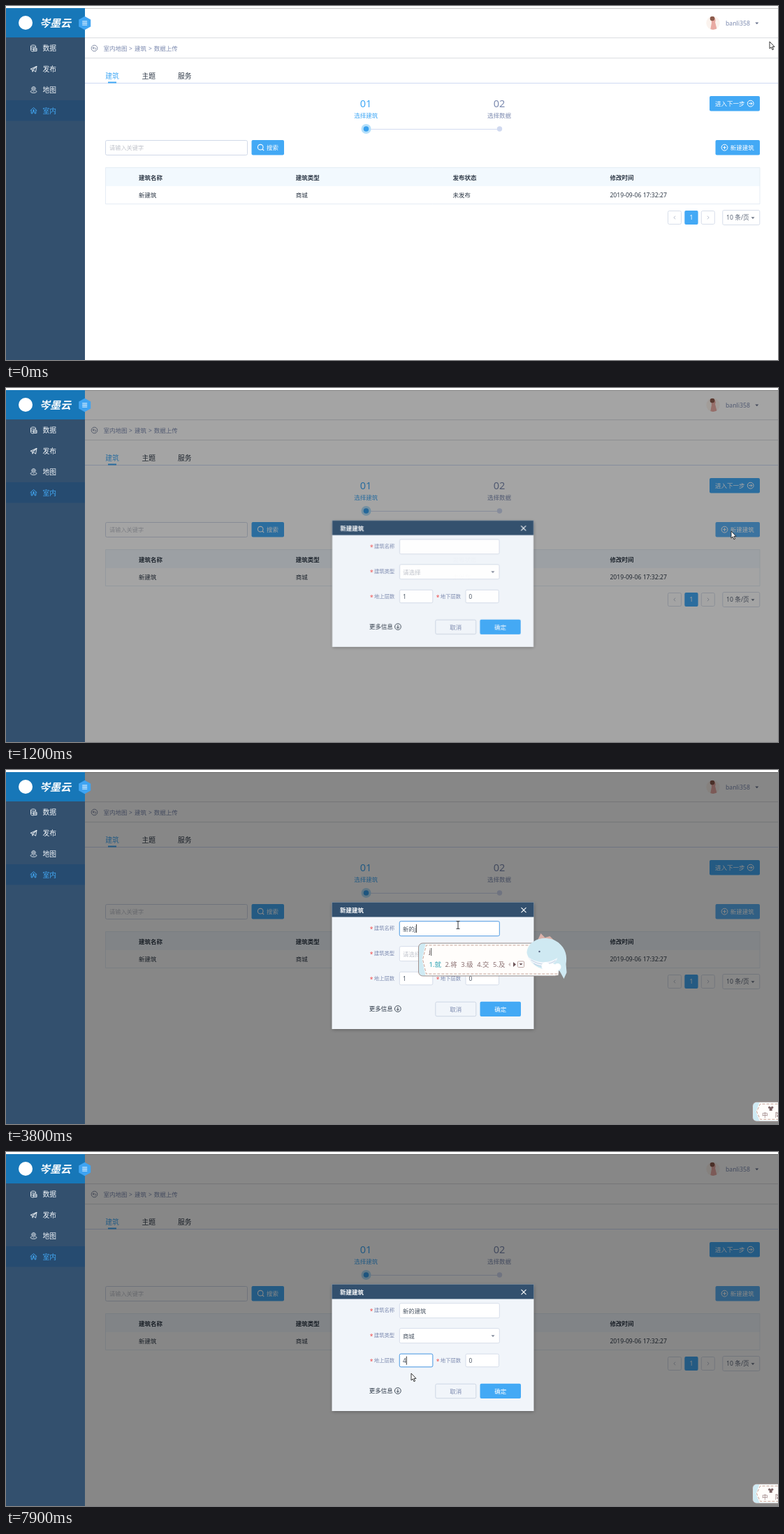
An HTML page with a canvas that plays this animation: 1105 by 507 pixels, repeating every 8 s.

```html
<!DOCTYPE html>
<html lang="zh-CN">
<head>
<meta charset="utf-8">
<style>
html, body { margin: 0; width: 100%; height: 100%; overflow: hidden; background: #fff; }
canvas { display: block; }
</style>
</head>
<body>
<canvas id="stage" width="1105" height="507"></canvas>
<script>
const W = 1105, H = 507, LOOP = 8000, STEP = 100;
const FONT = '"Noto Sans", "Noto Sans CJK SC", "Noto Sans CJK JP", sans-serif';
const BLUE = '#43a9f5', NAVY = '#33506e', LINE = '#d3dbe8', HINT = '#c0c4cc', DARK = '#2f3a48', MUTED = '#7d8bb0';

const screen = document.getElementById('stage').getContext('2d');
const layerCanvas = Object.assign(document.createElement('canvas'), { width: W, height: H });
const layer = layerCanvas.getContext('2d');
let c = screen;

const clamp = v => Math.max(0, Math.min(1, v));
const easeOut = u => 1 - (1 - u) ** 3;

// ---- drawing helpers ----
function text(s, x, y, color = DARK, size = 8.5, style = '', align = 'left') {
  c.font = `${style} ${size}px ${FONT}`;
  c.textAlign = align;
  c.fillStyle = color;
  c.fillText(s, x, y + size * 0.37);
}
function rect(x, y, w, h, fill) {
  c.fillStyle = fill;
  c.fillRect(x, y, w, h);
}
function box(x, y, w, h, fill, stroke, r = 2) {
  c.beginPath();
  c.roundRect(x, y, w, h, r);
  if (fill) { c.fillStyle = fill; c.fill(); }
  if (stroke) { c.strokeStyle = stroke; c.lineWidth = 0.9; c.stroke(); }
}
function disc(x, y, r, fill) {
  c.beginPath();
  c.arc(x, y, r, 0, 7);
  c.fillStyle = fill;
  c.fill();
}
function ring(x, y, r, color, width = 1) {
  c.beginPath();
  c.arc(x, y, r, 0, 7);
  c.strokeStyle = color;
  c.lineWidth = width;
  c.stroke();
}
function path(ox, oy, d, { fill, stroke, width = 1 }) {
  const p = new Path2D(d);
  c.save();
  c.translate(ox, oy);
  if (fill) { c.fillStyle = fill; c.fill(p); }
  if (stroke) { c.strokeStyle = stroke; c.lineWidth = width; c.stroke(p); }
  c.restore();
}
const line = (x, y, d, stroke, width = 1) => path(x, y, d, { stroke, width });
const caretDown = (x, y, fill) => path(x, y, 'M-2.5-1.2H2.5L0 1.5Z', { fill });
const caretUp = (x, y, fill) => path(x, y, 'M-2.5 1.2H2.5L0-1.5Z', { fill });

// ---- page ----
const NAV = [
  ['数据', 'M-4-3C-4-5 3-5 3-3S-4-1-4-3V3C-4 4-2 4.5 0 4.5M3-3V-1M-4 0C-4 1-2 1.5 0 1.5M0 0H4.5V4H0ZM0 2H4.5'],
  ['发布', 'M-4.5 0L4.5-4L3 4L-.5 1.5L-1.5 4L-2 .8ZM-2 .8L4.5-4L-.5 1.5'],
  ['地图', 'M0 2C-5-2-2-4.5 0-4.5S5-2 0 2M-1.3-1.7A1.3 1.3 0 1 0 1.3-1.7A1.3 1.3 0 1 0-1.3-1.7M-2.5 1C-6 2-4 4.3 0 4.3S6 2 2.5 1'],
  ['室内', 'M-4.8 0L0-4.3L4.8 0M-3.3-1V4H-1.5V1.5H1.5V4H3.3V-1M-1.5-.5H1.5M0-2V1.5']
];

function drawSidebar() {
  rect(0, 3, 113, 504, NAVY);
  rect(0, 3, 113, 42, '#1777b8');
  disc(28, 24, 10, '#fff');
  text('岑墨云', 48, 24, '#fff', 15, 'italic bold');
  rect(0, 135, 113, 29.5, '#264b70');
  NAV.forEach(([label, icon], i) => {
    const y = 60.5 + i * 29.8, color = i === 3 ? BLUE : '#f2f6fa';
    line(39.5, y, icon, color, 0.9);
    text(label, 52.5, y, color, 9.8);
  });
  path(112.7, 24.5, 'M0-9.7L8.5-5V5L0 9.7L-8.5 5V-5Z', { fill: '#3fa4f2' });
  line(112.7, 24.5, 'M-3.5-2.5H3.5M-3.5 0H3.5M-3.5 2.5H3.5', '#fff', 1.1);
}

function drawAvatar() {
  c.save();
  c.beginPath();
  c.arc(1012, 24.3, 9.7, 0, 7);
  c.clip();
  rect(1002, 14, 20, 21, '#fbf3ee');
  path(1012, 24, 'M-3-7C2-10 5-5 3-1L6 11H-4L-2 0Z', { fill: '#e9aaa3' });
  disc(1011, 18, 3.3, '#8b5a4c');
  c.restore();
}

function drawPage(hover) {
  rect(0, 0, W, H, '#fff');
  rect(0, 3, W, 1, '#c9c9c9');
  rect(113, 45.2, 992, 0.9, '#d6d9de');
  rect(113, 74.2, 992, 0.9, '#d6d9de');
  rect(113, 110, 992, 1, '#cfdaf3');
  drawAvatar();
  text('banli358', 1030, 24.3, MUTED, 8.7);
  caretDown(1074.8, 24.7, '#66718c');

  ring(126.5, 60.5, 4.3, '#77829c', 0.9);
  line(126.5, 60.5, 'M-.5-2L-2.5-.4L-.5 1.2M-2.5-.4H1C3-.4 2.5 2 .5 2', '#77829c', 0.8);
  [['室内地图', 139.5], ['>', 176], ['建筑', 184], ['>', 204], ['数据上传', 211.7]]
    .forEach(([s, x]) => text(s, x, 60.5, MUTED));

  text('建筑', 142.3, 100.3, BLUE, 9.8);
  text('主题', 194.5, 100.3, DARK, 9.8);
  text('服务', 246, 100.3, DARK, 9.8);
  rect(146, 108.5, 12, 2, BLUE);

  rect(515, 176, 191, 1, '#d3dcf0');
  disc(515.5, 176, 7, '#b5e0fa');
  disc(515.5, 176, 3.8, '#38a0ee');
  disc(706.5, 176, 3.7, '#d0d9f0');
  text('01', 515, 140, BLUE, 14.5, '', 'center');
  text('选择建筑', 515.3, 157, BLUE, 8.5, '', 'center');
  text('02', 706, 140, MUTED, 14.5, '', 'center');
  text('选择数据', 706, 157, MUTED, 8.5, '', 'center');

  box(1007, 129, 72, 21.5, BLUE);
  text('进入下一步', 1015, 139.7, '#fff', 8.5, '500');
  ring(1065.7, 139.7, 4.4, '#fff');
  line(1065.7, 139.7, 'M-2.5 0H2.3M.3-2L2.3 0L.3 2', '#fff');

  box(142.5, 192.5, 203, 21, '#fff', '#ccd5e6');
  text('请输入关键字', 148, 203.3, HINT, 8.2);
  box(351.5, 192, 46.5, 21.5, BLUE);
  ring(364.2, 202.2, 3.8, '#fff', 1.1);
  line(364.2, 202.2, 'M2.7 2.7L5 5', '#fff', 1.2);
  text('搜索', 373, 203, '#fff', 8.5, '500');
  box(1015.5, 192, 63.5, 21.5, hover ? '#5cb3f6' : BLUE);
  ring(1028.5, 202.7, 4.4, '#fff');
  line(1028.5, 202.7, 'M-2.3 0H2.3M0-2.3V2.3', '#fff');
  text('新建建筑', 1036.7, 203, '#fff', 8.5, '500');

  rect(142.5, 231.5, 936.5, 26.5, '#f2f9fe');
  box(142.5, 231.5, 936.5, 52, null, '#e3ebf4', 0);
  const rows = [['建筑名称', '建筑类型', '发布状态', '修改时间'], ['新建筑', '商城', '未发布', '2019-09-06 17:32:27']];
  rows.forEach((row, r) => row.forEach((s, i) =>
    text(s, 190 + i * 224.8, r ? 271 : 245.8, DARK, r && i === 3 ? 8.65 : 8.5, r ? '' : 'bold')));

  box(947.5, 293.5, 19, 19, '#fff', LINE);
  line(957, 303, 'M1.2-2.3L-1.2 0L1.2 2.3', '#b4bccb', 0.9);
  box(971.3, 293, 19.3, 20, BLUE);
  text('1', 981, 303, '#fff', 8.5, '', 'center');
  box(995.3, 293.5, 19, 19, '#fff', LINE);
  line(1005, 303, 'M-1.2-2.3L1.2 0L-1.2 2.3', '#b4bccb', 0.9);
  box(1025.8, 292.5, 53, 21, '#fff', LINE);
  text('10 条/页', 1031, 303.2, '#5c6678', 8.7);
  caretDown(1069, 303.5, '#6b7485');
}

// ---- dialog ----
function field(x, y, w, h, value, { focus, hint, color } = {}) {
  if (focus) box(x - 0.6, y - 0.6, w + 1.2, h + 1.2, '#b9dcfa', null, 3);
  box(x, y, w, h, '#fff', focus ? '#4b97e0' : LINE);
  text(value, x + 4.6, y + h / 2 + 0.2, color || (hint ? HINT : '#4d5866'), hint ? 8.5 : 8.4);
}
function label(s, x, y) {
  text('*', x - 6, y + 1.3, '#f04848', 8.5);
  text(s, x, y, MUTED, 7.35);
}
function caret(x, y) { rect(x, y - 6, 0.9, 12, '#222'); }

function drawDialog(s) {
  c.save();
  c.shadowColor = 'rgba(0,0,0,.35)';
  c.shadowBlur = 5;
  c.shadowOffsetY = 1;
  rect(466.5, 189.5, 289, 181.5, '#f1f5fa');
  c.restore();
  rect(466.5, 189.5, 289, 21, NAVY);
  text('新建建筑', 478, 200.8, '#fff', 8.5, 'bold');
  line(741, 200.7, 'M-3.5-3.5L3.5 3.5M3.5-3.5L-3.5 3.5', '#fff', 1.1);

  label('建筑名称', 526.8, 226.5);
  field(563.3, 216.7, 143, 21, s.name, { focus: s.focus === 'name' });
  if (s.nameCaret) caret(568 + c.measureText(s.name).width, 227);

  label('建筑类型', 526.8, 262.3);
  field(563.3, 252.7, 143, 21, s.type || '请选择', { focus: s.focus === 'type', hint: !s.type });
  (s.menuOpen ? caretUp : caretDown)(697, 263.5, '#7f8899');

  label('地上层数', 526.8, 298.3);
  field(563.3, 289.2, 47.5, 18.6, s.floors, { focus: s.focus === 'floors' });
  if (s.selected) {
    rect(568, 294, 4.8, 11, '#3390ff');
    text(s.floors, 567.9, 298.7, '#fff', 8.4);
  }
  if (s.floorCaret) caret(572.8, 298.7);
  label('地下层数', 621.8, 298.3);
  field(658, 289.2, 47.5, 18.6, '0');

  text('更多信息', 519.8, 342.3, DARK, 8.5, '500');
  ring(560.8, 342, 4.4, DARK, 0.9);
  line(560.8, 342, 'M0-2.5V2.2M-2 .4L0 2.3L2 .4', DARK, 0.9);
  box(614.8, 332.2, 58, 20.5, '#f1f5fa', '#cbd4e3');
  text('取消', 643.8, 342.5, MUTED, 8.5, '', 'center');
  box(678.5, 331.8, 58.5, 21.2, BLUE);
  text('确定', 707.8, 342.5, '#fff', 8.5, '500', 'center');
}

function drawMenu(open, hover) {
  if (open <= 0) return;
  c.save();
  c.globalAlpha = open;
  c.translate(0, 277);
  c.scale(1, 0.8 + 0.2 * open);
  c.save();
  c.shadowColor = 'rgba(0,0,0,.25)';
  c.shadowBlur = 4;
  box(563, 0, 143.5, 119, '#fafafa');
  c.restore();
  if (hover) rect(563, 3, 141, 20, '#f1f1f1');
  ['商城', '办公楼', '机场', '火车站', '展馆', '酒店'].forEach((s, i) =>
    text(s, 572.7, 13 + i * 19.65, '#5a6472'));
  box(704, 0, 2.5, 76, '#c2c4c8', null, 1);
  c.restore();
}

// ---- input method ----
const BROWN = '#8a6f70';
function imeFrame(x, y, w, h) {
  box(x, y, w, h, '#cfeaf3', '#9c8683', 6);
  path(x, y, `M10 1H${w - 1}V${h - 1}H10L5 ${h / 2}Z`, { fill: '#fffdfb' });
  c.save();
  c.setLineDash([4, 2]);
  line(x, y, `M${w - 2} 3H11L6 ${h / 2}L11 ${h - 3}H${w - 2}`, '#c09a8e', 0.9);
  c.restore();
}
function drawWhale(x, y) {
  const skin = c.createLinearGradient(x - 55, y, x, y + 55);
  [[0, '#cfe9f2'], [0.4, '#9fc0df'], [0.7, '#c9b4da'], [1, '#eab9bd']].forEach(([p, col]) => skin.addColorStop(p, col));
  path(x, y, 'M-44 14L-38 1L-32 7L-25 5L-20 10Z', { fill: '#d9b1a9' });
  path(x, y, 'M-58 29C-57 8-28 2-13 14C-2 23 0 34-2 45L-1 57L-5 66L-11 55L-20 52C-36 55-53 48-58 29Z', { fill: skin });
  path(x, y, 'M-57 34C-42 46-25 43-14 36C-19 51-48 53-57 34Z', { fill: '#f2f6fb' });
  line(x, y, 'M-52 39C-38 48-26 46-17 40M-48 44C-38 50-28 49-20 45', '#a9bfd8', 0.7);
  disc(x - 40, y + 27, 1.2, '#53617f');
  [[-31, 48, 6], [-22, 51, 7], [-14, 49, 5]].forEach(([dx, dy, r]) => disc(x + dx, y + dy, r, '#fff'));
}
function drawPopup({ left, spell, words }) {
  const extra = words.reduce((n, w) => n + w.length - 1, 0);
  const width = 201 + extra * 9.4;
  imeFrame(left, 248, width, 47);
  drawWhale(left + width + 12, 233);
  text(spell, left + 15, 260, '#5b4a4e', 9);
  rect(left + 15.5 + c.measureText(spell).width, 255, 0.8, 11, '#333');
  let x = left + 15;
  words.forEach((w, i) => {
    text(`${i + 1}.${w}`, x, 278.5, i ? BROWN : '#25a0b0', 9.4);
    x += 13.5 + w.length * 9.4;
  });
  path(x - 1, 278.5, 'M0 0L3-3V3Z', { fill: '#d0c4c4' });
  path(x + 6, 278.5, 'M4 0L0-3.5V3.5Z', { fill: '#6d5558' });
  box(x + 12.5, 274, 9, 8.5, '#fff', '#b79c98', 1);
  caretDown(x + 17, 278.3, '#6d5558');
}
function drawImeBar() {
  imeFrame(1068.5, 475.3, 50, 28);
  path(1094.7, 485, 'M-4-2L-2-3.5L0-2L2-3.5L4-2L3 0L2-.5V3H-2V-.5L-3 0Z', { fill: '#7c6365' });
  text('中', 1082, 494, BROWN, 8.5);
  text('简', 1100.5, 494, BROWN, 8.5);
}

// ---- timeline ----
// time, committed text, typed letters, spelling shown, candidates
const TYPING = [
  [2800, '', 'x', 'x', '小 下 想 新 西'],
  [2900, '', 'xi', 'xi', '系 西 洗 喜 细'],
  [3000, '', 'xin', 'xin', '新 心 信 辛 欣'],
  [3200, '', 'xind', "xin'd", '新的 心得 新点 心电 信'],
  [3300, '', 'xinde', "xin'de", '新的 心得 信的 新得 心的'],
  [3600, '新的'],
  [3800, '新的', 'j', 'j', '就 将 级 交 及'],
  [3900, '新的', 'ji', 'ji', '及 级 几 机 既'],
  [4000, '新的', 'jia', 'jia', '加 家 假 价 架'],
  [4100, '新的', 'jian', 'jian', '见 件 间 建 减'],
  [4200, '新的', 'jianzh', "jian'zh", '建筑 建筑 兼职 见证 价值'],
  [4300, '新的', 'jianzhu', "jian'zhu", '建筑 兼住 见诸 建主 煎'],
  [4500, '新的建筑']
];

// time, x, y of the pointer's hot spot
const POINTER = [
  [0, 1093, 51], [100, 1088, 68], [200, 1074, 112], [300, 1058, 160], [400, 1044, 195], [500, 1038, 205],
  [1300, 1038, 205], [1400, 960, 209], [1500, 810, 216], [1600, 690, 221], [1700, 647, 222],
  [4900, 647, 222], [5000, 647, 228], [5300, 645, 264], [5800, 645, 264], [6200, 601, 292],
  [6700, 601, 292], [7000, 580, 299.5], [7800, 580, 299.5], [7900, 580, 317]
];
function pointerAt(t) {
  const i = POINTER.findIndex(p => p[0] > t);
  if (i < 0) return POINTER[POINTER.length - 1].slice(1);
  const [t0, x0, y0] = POINTER[i - 1], [t1, x1, y1] = POINTER[i];
  const u = (t - t0) / (t1 - t0);
  return [x0 + (x1 - x0) * u, y0 + (y1 - y0) * u];
}
function drawPointer(t) {
  const [x, y] = pointerAt(t);
  const beam = (t >= 1700 && t < 5100) || (t >= 6900 && t < 7900);
  const hand = t >= 5200 && t < 6900;
  if (beam) {
    line(x, y, 'M-2.5-5.3H2.5M0-5.3V5.3M-2.5 5.3H2.5', '#30343a', 1);
  } else if (hand) {
    path(x, y, 'M-1 0Q.3-1 1.5 0V5L6 6.2Q7 7 6.5 10L5.5 14H-.5L-4 9Q-4.5 7-3 7.3L-1 9Z', { fill: '#fff', stroke: '#222', width: 0.9 });
    line(x, y, 'M3 5.8V8M4.8 6.2V8.3', '#222', 0.7);
  } else {
    path(x, y, 'M0 0V10L2.3 8L4 11.8L5.6 11L3.9 7.4H7Z', { fill: '#fff', stroke: '#222', width: 0.9 });
  }
}

function dialogState(t) {
  const typed = TYPING.filter(k => k[0] <= t).pop() || [0, ''];
  const [, done, letters = '', spell, words] = typed;
  let focus = '';
  if (t >= 1800 && t < 5500) focus = 'name';
  else if (t >= 5500 && t < 7100) focus = 'type';
  else if (t >= 7100) focus = 'floors';
  return {
    focus,
    name: done + letters,
    nameCaret: (t >= 1800 && t < 2300) || (t >= 2800 && t < 5000),
    type: t >= 6400 ? '商城' : '',
    menuOpen: t >= 5500 && t < 6400,
    floors: t >= 7900 ? '4' : '1',
    selected: t >= 7200 && t < 7900,
    floorCaret: t >= 7900 || (t >= 7100 && t < 7200),
    popup: letters && { left: done ? 590.5 : 573, spell, words: words.split(' ') }
  };
}

function render(t) {
  c = screen;
  drawPage(t >= 500);
  const shown = clamp((t - 880) / 420);
  if (shown) {
    rect(113, 3, 992, 504, `rgba(0,0,0,${0.47 * shown})`);
    const state = dialogState(t), e = easeOut(shown), k = 0.8 + 0.2 * e;
    c = layer;
    c.clearRect(0, 0, W, H);
    drawDialog(state);
    c = screen;
    c.save();
    c.globalAlpha = e;
    c.translate(611, 280.5);
    c.scale(k, k);
    c.drawImage(layerCanvas, -611, -280.5);
    c.restore();
    drawMenu(clamp((t - 5400) / 300) - clamp((t - 6300) / 300), t >= 6000);
    if (state.popup) drawPopup(state.popup);
    if ((t >= 1900 && t < 5500) || t >= 7100) drawImeBar();
  }
  drawSidebar();
  drawPointer(t);
}

function tick() {
  const t = performance.now() % LOOP;
  render(Math.floor(t / STEP) * STEP);
  requestAnimationFrame(tick);
}
tick();
</script>
</body>
</html>
```
